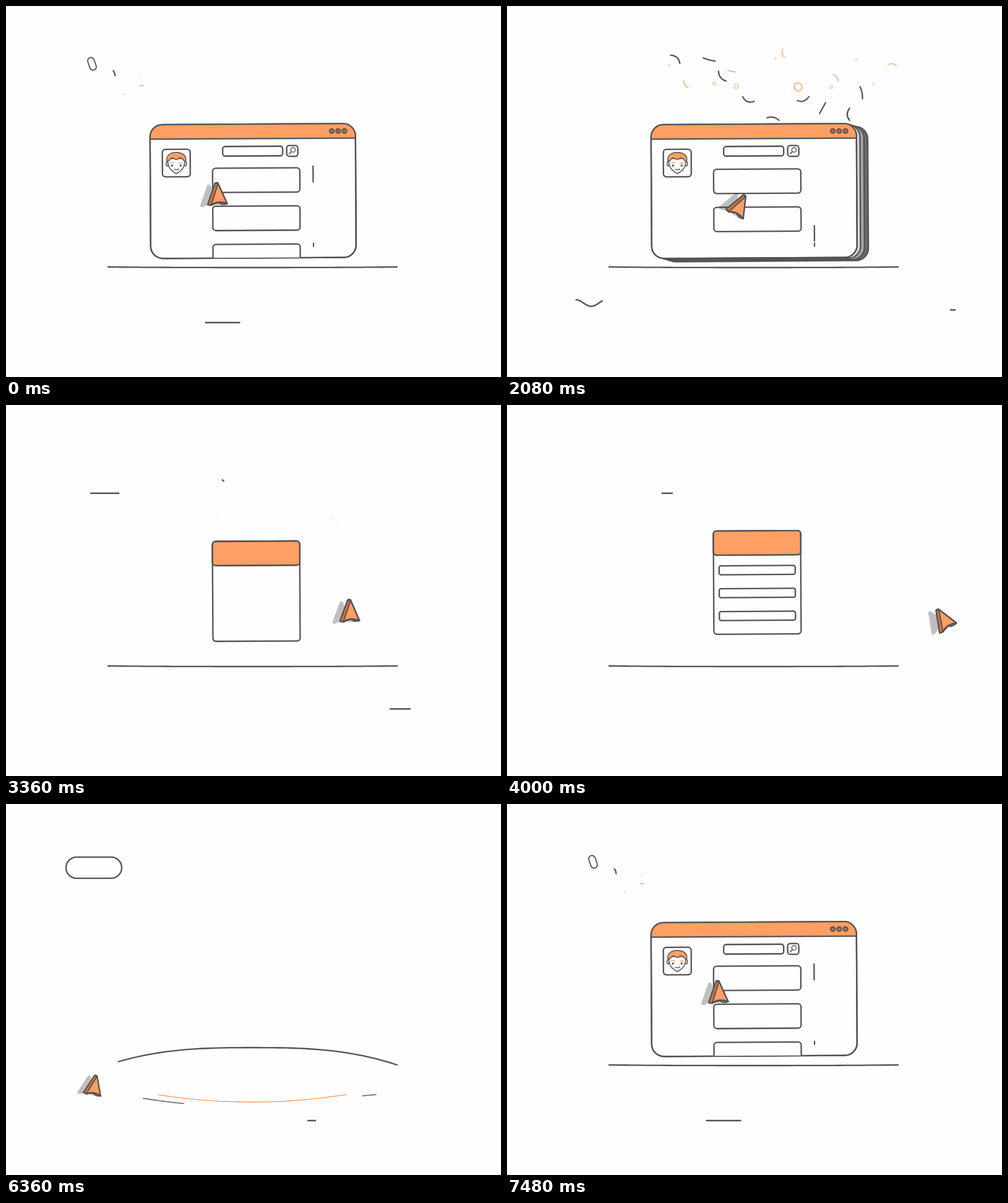
An HTML page with a canvas that plays this animation: 800 by 600 pixels, repeating every 7.52 s.

```html
<!DOCTYPE html>
<html lang="en">
<head>
<meta charset="utf-8">
<title>Browser and paper plane</title>
<style>
html, body { margin: 0; width: 100%; height: 100%; overflow: hidden; background: #fefefe; }
canvas { display: block; }
</style>
</head>
<body>
<canvas id="stage" width="800" height="600"></canvas>
<script>
const c = document.getElementById('stage').getContext('2d');
const INK = '#545254', ORANGE = '#ff9f63', FOLD = '#cf743f', PAPER = '#fefefe';
const LOOP = 7520, LAST = 7480, STEP = 40, TAU = Math.PI * 2;
const CX = 399.5, CY = 299, TILT = -0.0055;

const clamp = v => Math.max(0, Math.min(1, v));
const mix = (a, b, p) => a + (b - a) * p;
const span = (t, a, b) => clamp((t - a) / (b - a));
const smooth = p => p * p * (3 - 2 * p);
const ramp = (t, a, b) => smooth(span(t, a, b));
const wrap = t => t < 1000 ? t + LAST : t;   // for motion that crosses the loop point
const rnd = (i, seed) => {
  const v = Math.sin(i * 127.1 + seed * 311.7) * 43758.5;
  return v - Math.floor(v);
};

// Back-out easing for things that pop into place
function pop(t, a, b) {
  const p = span(t, a, b) - 1;
  return 1 + 2.7 * p * p * p + 1.7 * p * p;
}

function paint(fill, stroke = INK, lw = 2.3) {
  if (fill) { c.fillStyle = fill; c.fill(); }
  if (stroke) { c.strokeStyle = stroke; c.lineWidth = lw; c.stroke(); }
}
function box(x, y, w, h, r, fill, stroke, lw) {
  c.beginPath();
  c.roundRect(x, y, w, h, r);
  paint(fill, stroke, lw);
}
function line(x0, y0, x1, y1, lw = 2.3, color = INK) {
  c.beginPath(); c.moveTo(x0, y0); c.lineTo(x1, y1);
  paint(null, color, lw);
}
function oval(x, y, rx, ry, fill, stroke, lw) {
  c.beginPath(); c.ellipse(x, y, rx, ry, 0, 0, TAU);
  paint(fill, stroke, lw);
}
function path(d, fill, stroke, lw) {
  const p = new Path2D(d);
  if (fill) { c.fillStyle = fill; c.fill(p); }
  if (stroke) { c.strokeStyle = stroke; c.lineWidth = lw; c.stroke(p); }
}
function plot(f, x0, x1, lw, color = INK) {
  if (Math.abs(x1 - x0) < 0.5) return;
  c.beginPath();
  for (let i = 0; i <= 40; i++) { const x = mix(x0, x1, i / 40); c.lineTo(x, f(x)); }
  paint(null, color, lw);
}
// Draws around a pivot with rotation and scale
function at(x, y, rot, sx, sy, draw) {
  if (sx <= 0.01 || sy <= 0.01) return;
  c.save();
  c.translate(x, y); c.rotate(rot); c.scale(sx, sy); c.translate(-x, -y);
  draw();
  c.restore();
}
function capsule(x, y, w, h, rot, s, lw = 2.3, color = INK) {
  at(x, y, rot, s, s, () => box(x - w / 2, y - h / 2, w, h, Math.min(w, h) / 2, null, color, lw));
}

/* ---------- background strokes ---------- */
function ground(t) {
  if (t >= 4600 && t < 5880) return;
  const leaving = t < 4600, swing = Math.max(0, t - 6360);
  const start = leaving ? ramp(t, 4080, 4620) : Math.pow(1 - span(t, 5880, 6400), 1.3);
  const bend = leaving ? 1 - 40 * ramp(t, 4000, 4560)
    : 1 - 29 * Math.exp(-swing / 150) * Math.cos(swing / 50);
  const y = x => 422 + bend * (1 - Math.abs((x - 398.5) / 233.5) ** 2.8);
  plot(y, mix(165, 632, start), 632);
}

// A dash that grows, travels and shrinks at constant speed
function dash(t, start, time, from, dist, len, y) {
  const moved = dist * span(t, start, start + time);
  const size = Math.min(Math.abs(moved), len, Math.abs(dist - moved));
  plot(y, from + moved, from + moved - Math.sign(dist) * size, 2.4);
}
function dashes(t) {
  dash(wrap(t), 6280, 1940, 500, -287, 55, () => 512);
  dash(t, 1987, 1800, 724, -135, 43, () => 491.5);
  dash(t, 2664, 1457, 90, 193, 45, () => 142.8);
  dash(t, 1400, 1250, 83, 130, 42, x => 480.3 - 5.3 * Math.cos((x - 111) * TAU / 50));
}

function pills(t) {
  capsule(690.5, 171, 45.5, 18.5, 0, Math.min(pop(t, 540, 780), 1 - ramp(t, 1320, 1520)));
  capsule(142, 103, 90, 34.3, 0, Math.min(pop(t, 5280, 5540), 1 - ramp(t, 7120, 7260)));
}

// Wake of the plane, once per lap
function trails(t) {
  for (const start of [4920, 5840]) {
    const p = span(t, start, start + 867);
    const head = 1 - (1 - p) ** 2, tail = p ** 2.5;
    const wake = (from, dist, low, bow, color) =>
      plot(x => low - bow * ((x - 397) / 160) ** 2, from + dist * head, from + dist * tail, 1.4, color);
    wake(700, -540, 482, 13.2, ORANGE);
    wake(320, -117, 490, 11.7);
    wake(609, -39, 480, 6.4);
  }
}

/* ---------- confetti ---------- */
function burst(t, start, seed, x, y, w, top, bottom, ribbons, rings, size) {
  const out = 1 - (1 - span(t, start, start + 320)) ** 2;
  const fall = ramp(t, start + 320, start + 1040);
  const s = out * mix(1, 0.15, fall) * (1 - span(t, start + 1040, start + 1200));
  if (s < 0.02) return;
  const spread = (i, n, k) => [
    mix(x, x + w * ((i + rnd(i, k)) / n - 0.5), mix(0.4, 1, out)),
    mix(y, mix(top, bottom, rnd(i, k + 1)), out) + 14 * fall
  ];
  for (let i = 0; i < ribbons; i++) {
    const [px, py] = spread(i, ribbons, seed);
    const thin = i % 3 === 1, len = s * size * (thin ? 7 : 10);
    at(px, py, rnd(i, seed + 2) * TAU, 1, 1, () => {
      c.beginPath(); c.moveTo(-len + px, py);
      c.quadraticCurveTo(px, py + len * (rnd(i, seed + 3) * 2 - 1), px + len, py);
      paint(null, thin ? ORANGE : INK, thin ? 1.3 : 2.2);
    });
  }
  for (let i = 0; i < rings; i++) {
    const [px, py] = spread(i, rings, seed + 5);
    const r = size * (1.5 + 6.5 * rnd(i, seed + 7) ** 2);
    at(px, py, i, s, s, () => oval(px, py, r, r * 0.85, null, ORANGE, 0.4 + r * 0.16));
  }
}
function confetti(t) {
  burst(t, 1760, 3, 440, 205, 370, 70, 185, 14, 8, 1);
  burst(t, 2480, 8, 455, 260, 300, 85, 195, 1, 4, 0.6);
  burst(wrap(t), 7220, 12, 205, 105, 70, 60, 160, 2, 2, 0.45);
  capsule(356, 124.5, 10, 18, 0.6, Math.min(ramp(t, 2480, 2740), 1 - ramp(t, 2840, 3160)), 1, ORANGE);
  const n = wrap(t), out = ramp(n, 7220, 7480);
  capsule(139, 93.5, 10.6, 21, -0.33, out * (1 - ramp(n, 7500, 7800)), 1.8);
}

/* ---------- window ---------- */
// Turns a sheet edge-on and away
function leave(t, start, dx, dy, draw) {
  const p = span(t, start, start + 440);
  const sx = 1 - 1.32 * p ** 2.07, sy = 1 - 0.072 * Math.sqrt(p);
  at(CX + dx, CY + dy, TILT - 1.127 * p ** 1.74, sx, sy, () => {
    c.translate(dx, dy);
    draw();
  });
}
const frame = fill => box(233.3, 191, 332, 216.5, 20, fill);

function sheet(t, born, gone, dx, dy, fill) {
  if (t < born || t > gone + 440) return;
  const n = t - born, wave = Math.exp(-n / 180) * Math.sin(n * TAU / 640);
  const k = ramp(n, 0, 160) + wave / 2, s = 1 + 0.088 * wave;
  leave(t, gone, dx * k, dy * k, () => at(CX, CY, -0.093 * wave, s, s, () => frame(fill)));
}
function sheets(t) {
  sheet(t, 1400, 2740, 18, 5, '#6b6b6b');
  sheet(t, 1100, 2500, 12, 3.5, '#a4a4a4');
  sheet(t, 800, 2340, 5.5, 1.5, '#dedede');
}

function alert(t, x, start) {
  if (t < start) return;
  const y = 212 - 76 * ramp(t, start, start + 250), s = 1 - ramp(t, 1500, 1700);
  at(x, y, 0, s, s, () => {
    box(x - 14.5, y - 14.5, 29, 29, 4, ORANGE);
    for (const [color, w] of [[INK, 4.6], ['#fff', 2]]) {
      line(x, y - 9, x, y + 3, w, color);
      line(x, y + 8, x, y + 8.4, w, color);
    }
  });
}

function face() {
  box(253, 231, 45, 44.5, 5, PAPER);
  for (const side of [-1, 1]) oval(275.5 + side * 14.5, 254.5, 2, 3.6, PAPER, INK, 1.5);
  path('M261.5 246C261 260 266 265 275.5 270.5C285 265 290 260 289.5 246Z', PAPER, INK, 1.6);
  path('M260.5 251C258 241 266 236 275.5 236C285 236 293 241 290.5 251L287 249C285 245 282 244 279 246Q275.5 249 272 246C269 244 266 245 264 249Z', ORANGE, INK, 1.5);
  for (const side of [-1, 1]) {
    const x = 275.5 + side * 7;
    line(x - 3, 253 + side * 0.4, x + 3, 253 + side * 0.4, 1.4, ORANGE);
    oval(x, 257.3, 1.7, 1.7, INK, null);
  }
  path('M272 263.5Q276 265 279.5 263', null, INK, 1.4);
}

function rows(t, late) {
  const scroll = late ? 0 : 121.5 * ramp(t, 910, 1560);
  c.save();
  c.beginPath(); c.rect(300, 250, 190, 157); c.clip();
  for (let i = 0; i < 4; i++) {
    if (i === 2 && t >= 2180 && !late) continue;   // drawn as the card by then
    const y = 262 + i * 61.6 - scroll;
    let s = 1;
    if (late) s = pop(t, 6900 + i * 80, 7160 + i * 80);
    else if (i < 2) s = 1 - ramp(t, 880 + i * 240, 1120 + i * 240);
    at(404.5, y + 19.5, 0, s, s, () => box(334, y, 141, 39.3, 5, PAPER));
  }
  c.restore();
  const grow = late ? ramp(t, 7050, 7300) : 1;
  if (!grow) return;
  const top = late ? 0 : ramp(t, 860, 1560), end = late ? 0 : ramp(t, 800, 1300);
  line(496.5, 259.5 + 96.5 * top, 496.5, 259.5 + 25.5 * grow + 96 * end);
  line(496.5, 384.5, 496.5, 389);
}

function browser(t) {
  if (t > 2640 && t < 6520) return;
  const late = t > 6000, s = late ? pop(t, 6520, 6920) : 1;
  const show = (start, x, y, draw) => {
    const k = late ? pop(t, start, start + 240) : 1;
    at(x, y, 0, k, k, draw);
  };
  leave(late ? 0 : t, 2180, 0, 0, () => at(CX, CY, 0, s, s, () => {
    frame(PAPER);
    c.save();
    c.clip();
    c.fillStyle = ORANGE; c.fillRect(230, 188, 340, 26.5);
    line(233, 214.5, 565, 214.5);
    c.restore();
    frame(null);
    for (let i = 0; i < 3; i++) oval(527 + i * 10.3, 203, 3.6, 3.6, '#b56c4a', INK, 2);
    show(6800, 275.5, 253, face);
    show(6840, 399, 235, () => box(350.5, 227, 97, 15.5, 4, PAPER));
    show(6900, 463, 235, () => {
      box(454, 226, 18, 17.5, 4, PAPER);
      oval(464.3, 233, 3.7, 3.7, null, INK, 1.4);
      line(461.5, 236, 458, 239.5, 1.6);
    });
    rows(t, late);
  }));
}

/* ---------- card ---------- */
function card(t) {
  if (t < 2180 || t >= 4520) return;
  const close = ramp(t, 4080, 4320), s = 1 - ramp(t, 4280, 4500);
  const y = 263.5 - 2 * ramp(t, 2400, 2760) - 58 * ramp(t, 3000, 3560) + 64 * close;
  const h = 39 + 99 * ramp(t, 2480, 2800) + 29 * ramp(t, 2840, 3560) - 128 * close;
  at(CX, CY, TILT, 1, 1, () => at(404.5, y + h / 2, 0, s, s, () => {
    box(334, y, 141, h, 5, PAPER);
    for (let i = 0; i < 3; i++) {
      const cy = y + 63.5 + i * 37;
      const k = Math.min(pop(t, 3440 + i * 120, 3680 + i * 120), 1 - ramp(t, 4040, 4140));
      at(404.5, cy, 0, k, k, () => box(343, cy - 7.2, 123, 14.5, 3, PAPER));
    }
    box(334, y, 141, 39, 5, PAPER);
    c.globalAlpha = ramp(t, 2320, 2440);
    box(334, y, 141, 39, 5, ORANGE);
    c.globalAlpha = 1;
  }));
  const a = 380 + 45 * ramp(t, 2680, 3040), b = 380 + 45 * ramp(t, 2640, 2900);
  if (b - a > 0.5) line(404.5, a, 404.5, b, 2.2);
}

/* ---------- paper plane ---------- */
// time, tip x, tip y, rotation in degrees, scale
const stops = [
  [0, 340, 286, -1, 1],
  [960, 499.5, 284, -45, 0.65],
  [1500, 499.5, 374, -42, 0.65],
  [2080, 384, 306, 30, 1],
  [2800, 384, 276, 48, 1],
  [3760, 657, 338, -29, 1],
  [4000, 695, 331, -29, 1],
  [4440, 850, 300, -10, 1],
  [6360, 145, 439, 13, 0.9],
  [LAST, 340, 286, -1, 1]
];
function pose(t) {
  if (t >= 4840 && t < 6360) {   // flat laps around the stage
    const u = (t - 4840) / 1520, a = 10.15 * u, sin = Math.sin(a);
    const r = 335 + 72 * Math.max(0, 1 - u * 4);
    return [395 + r * Math.cos(a), 462 + 35 * sin, -43.6 - 85 * sin, 0.9 + 0.06 * (sin + 0.666)];
  }
  if (t >= 4440 && t < 4840) return null;
  const i = stops.findIndex(s => s[0] > t), a = stops[i - 1], b = stops[i];
  const p = ramp(t, a[0], b[0]);
  return a.slice(1).map((v, k) => mix(v, b[k + 1], p));
}
function plane(t) {
  const now = pose(t);
  if (!now) return;
  const [x, y, rot, s] = now;
  const outline = 'M-2 .5Q0 -1 2.5 .5L17 34Q2 28 -9 36L-14.5 35Z';
  const draw = (px, py, fn) => {
    c.save();
    c.translate(px, py); c.rotate(rot * TAU / 360); c.scale(s, s);
    fn();
    c.restore();
  };
  const lift = ramp(s, 0.55, 1.05);
  draw(x - 2 - 11 * lift, y + 3 - 0.2 * Math.max(0, rot), () => path(outline, 'rgba(60,58,60,.32)'));
  draw(x, y, () => {
    path('M-9 36Q4 26 17 34Q8 37 3 32Z', FOLD, INK, 2);
    path(outline, ORANGE, INK, 2.5);
    path('M-2 .5L2.5 1.5L-9 36L-14.5 35Z', FOLD, INK, 2);
  });
}

function render(t) {
  c.fillStyle = PAPER;
  c.fillRect(0, 0, 800, 600);
  dashes(t);
  pills(t);
  confetti(t);
  ground(t);
  alert(t, 479, 800);
  sheets(t);
  if (t < 1700) alert(t, 309.5, 890);
  browser(t);
  card(t);
  trails(t);
  plane(t);
}

c.lineCap = c.lineJoin = 'round';
const begin = performance.now();
function tick() {
  const t = Math.floor(((performance.now() - begin) % LOOP) / STEP) * STEP;
  render(t % LAST);
  requestAnimationFrame(tick);
}
tick();
</script>
</body>
</html>
```
